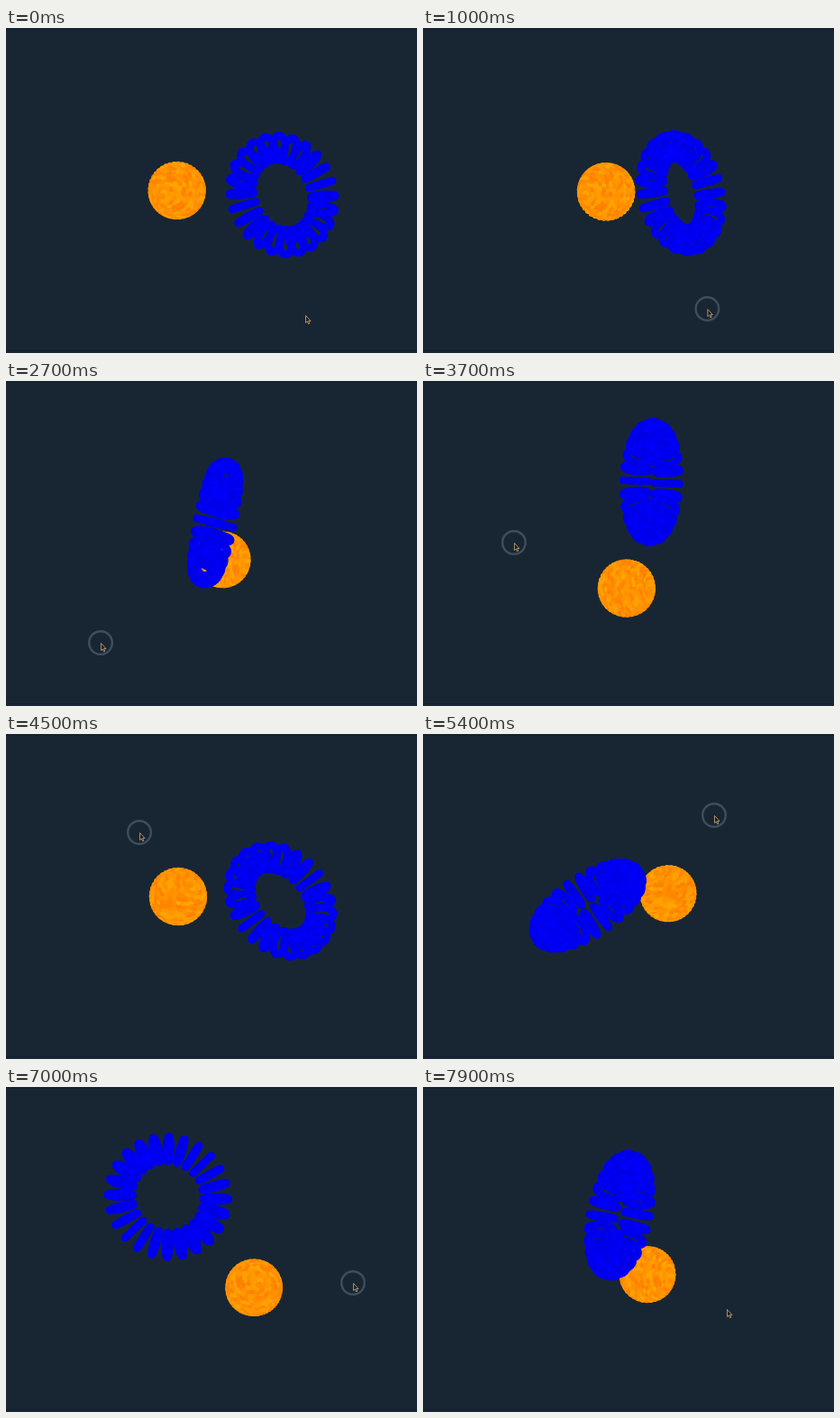
An HTML page with a canvas that plays this animation: 456x360 px, repeating every 8 s.

```html
<!DOCTYPE html>
<html lang="en">
<head>
<meta charset="utf-8">
<title>Orbiting ring and ball</title>
<style>
  html, body { margin: 0; width: 100%; height: 100%; overflow: hidden; background: #182634; }
  canvas { display: block; }
</style>
</head>
<body>
<canvas id="stage" width="456" height="360"></canvas>
<script>
const ctx = document.getElementById('stage').getContext('2d');
const LOOP = 8000, STEP = 100, TAU = Math.PI * 2, DEG = Math.PI / 180;
const CX = 237, CY = 182, DEPTH = 3500, SPAN = 138.5;
const RING = 54, TUBE = 14, SPOKES = 24, BALL = 28.5;
const PRESS = 700, RELEASE = 7700;

// Pointer path: time, x, y
const path = [
  [0, 332, 318], [PRESS, 332, 310], [1700, 222, 312], [2700, 105, 290],
  [3350, 93, 215], [4500, 148, 109], [5400, 323, 90], [6300, 417, 150],
  [7000, 385, 217], [RELEASE, 337, 246]
];

// Poses the drag passes through: time, yaw, pitch, roll
const poses = [
  [PRESS, 122, 2, 191.5], [1700, -114, 0, 191.5], [2700, -3.5, -17, 192],
  [4500, 124.5, 2, 25], [5400, -40, 5.5, 52], [7000, -90, -46.5, 165],
  [RELEASE, -14.5, -28, 192.5]
].map(([t, ...angles]) => ({ t, m: basis(...angles.map(a => a * DEG)) }));

function dot(a, b) { return a[0] * b[0] + a[1] * b[1] + a[2] * b[2]; }
function cross(a, b) {
  return [a[1] * b[2] - a[2] * b[1], a[2] * b[0] - a[0] * b[2], a[0] * b[1] - a[1] * b[0]];
}
// Rows: direction from ball to ring, ring normal, and their cross product
function basis(yaw, pitch, roll) {
  const { sin, cos } = Math;
  const x = [sin(yaw) * cos(pitch), sin(pitch), cos(yaw) * cos(pitch)];
  const side = [cos(yaw), 0, -sin(yaw)];
  const up = [-sin(yaw) * sin(pitch), cos(pitch), -cos(yaw) * sin(pitch)];
  const y = side.map((s, i) => s * cos(roll) + up[i] * sin(roll));
  return [x, y, cross(x, y)];
}
function spin(m, axis, angle) {
  const len = Math.hypot(...axis);
  if (len < 1e-6) return m;
  const a = axis.map(e => e / len), c = Math.cos(angle), s = Math.sin(angle);
  return m.map(v => {
    const k = dot(a, v) * (1 - c), w = cross(a, v);
    return v.map((e, i) => e * c + w[i] * s + a[i] * k);
  });
}
// Rotation that carries one basis onto another
function between(from, to) {
  const axis = [0, 0, 0];
  let trace = 0;
  from.forEach((v, i) => {
    cross(v, to[i]).forEach((e, j) => axis[j] += e);
    trace += dot(v, to[i]);
  });
  return { axis, angle: Math.acos(Math.max(-1, Math.min(1, (trace - 1) / 2))) };
}

// Smooth curve through the pointer path, at rest at both ends
function slope(i, k) {
  if (i < 2 || i === path.length - 1) return 0;
  const a = path[i - 1], b = path[i + 1];
  return (b[k] - a[k]) / (b[0] - a[0]);
}
function pointerAt(t) {
  let i = 0;
  while (i < path.length - 2 && t >= path[i + 1][0]) i++;
  const a = path[i], b = path[i + 1], span = b[0] - a[0];
  const u = Math.min(1, (t - a[0]) / span), v = 1 - u;
  return [1, 2].map(k =>
    a[k] * v * v * (1 + 2 * u) + b[k] * u * u * (3 - 2 * u) +
    span * u * v * (slope(i, k) * v - slope(i + 1, k) * u));
}

// One degree of turn per pixel dragged
function drag(m, t) {
  const [x0, y0] = pointerAt(t - STEP), [x1, y1] = pointerAt(t);
  const dx = x1 - x0, dy = y1 - y0;
  return spin(m, [-dy, -dx, 0], Math.hypot(dx, dy) * DEG);
}
// Drag from pose to pose, easing out the small error on the way
function orient() {
  const views = [];
  for (let t = 0; t <= PRESS; t += STEP) views.push(poses[0].m);
  for (let i = 1; i < poses.length; i++) {
    const a = poses[i - 1], b = poses[i], run = [];
    let m = a.m;
    for (let t = a.t + STEP; t <= b.t; t += STEP) run.push(m = drag(m, t));
    const fix = between(m, b.m);
    run.forEach((r, j) => views.push(spin(r, fix.axis, fix.angle * (j + 1) / run.length)));
  }
  return views;
}
const views = orient();

let seed = 71;
const rand = () => (seed = (seed * 16807) % 2147483647) / 2147483647;

const ball = { shift: -.4 * SPAN, size: 3.5, dots: [] };
for (let i = 0; i < 500; i++) {
  const y = 1 - (2 * i + 1) / 500, r = Math.sqrt(1 - y * y), a = i * 2.39996;
  ball.dots.push({
    p: [BALL * r * Math.cos(a), BALL * y, BALL * r * Math.sin(a)],
    color: `rgb(255,${Math.round(126 + 42 * rand())},0)`
  });
}

const ring = { shift: .6 * SPAN, size: 4, dots: [] };
for (let i = 0; i < SPOKES; i++) {
  const a = i * TAU / SPOKES;
  for (let j = 0; j < 28; j++) {
    const b = j * TAU / 28, r = RING + TUBE * Math.cos(b);
    ring.dots.push({
      p: [r * Math.cos(a), TUBE * Math.sin(b), r * Math.sin(a)],
      color: `rgb(0,0,${Math.round(225 + 30 * rand())})`
    });
  }
}

function drawBody({ shift, size, dots }, m) {
  const zoom = 1 + shift * m[0][2] / DEPTH;
  const at = (p, k) => zoom * ((p[0] + shift) * m[0][k] + p[1] * m[1][k] + p[2] * m[2][k]);
  for (const { p, color } of dots) {
    ctx.fillStyle = color;
    ctx.beginPath();
    ctx.arc(CX + at(p, 0), CY + at(p, 1), size * zoom, 0, TAU);
    ctx.fill();
  }
}

const arrow = new Path2D('M.5 .5V8.5L2.3 7L3.6 9.8L4.8 9.2L3.6 6.5H6Z');
function drawPointer(t) {
  const [x, y] = pointerAt(t);
  if (t >= PRESS && t < RELEASE) {
    ctx.strokeStyle = '#404e5b';
    ctx.lineWidth = 2.4;
    ctx.beginPath();
    ctx.arc(x, y, 12.8, 0, TAU);
    ctx.stroke();
  }
  ctx.save();
  ctx.translate(x, y);
  ctx.fillStyle = '#1b1e24';
  ctx.strokeStyle = '#bd9a70';
  ctx.lineWidth = .9;
  ctx.fill(arrow);
  ctx.stroke(arrow);
  ctx.restore();
}

function draw(t) {
  ctx.fillStyle = '#182634';
  ctx.fillRect(0, 0, 456, 360);
  ctx.fillStyle = '#131f2b';
  ctx.fillRect(0, 1, 456, 1);
  ctx.fillRect(0, 357, 456, 1);

  const m = views[Math.min(t / STEP, views.length - 1)];
  const order = m[0][2] > 0 ? [ball, ring] : [ring, ball];
  order.forEach(body => drawBody(body, m));
  drawPointer(t);
}

const start = performance.now();
function tick() {
  const t = (performance.now() - start) % LOOP;
  draw(Math.floor(t / STEP) * STEP);
  requestAnimationFrame(tick);
}
tick();
</script>
</body>
</html>
```
